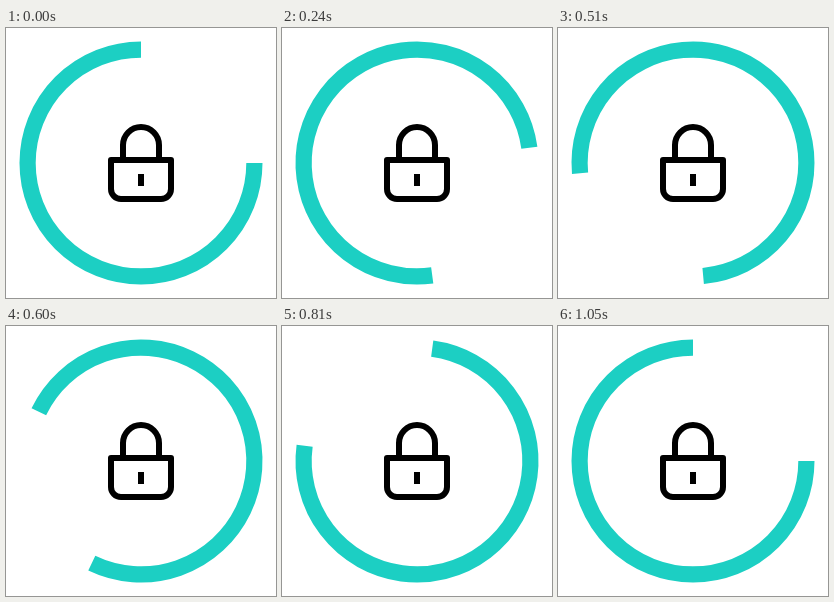
Recreate the animation shown at these times as an HTML page. Size 270 by 270 pixels, loop 1080 ms.

```html
<!DOCTYPE html>
<html lang="en">
<head>
<meta charset="utf-8">
<title>Locked loader</title>
<style>
  html, body { margin: 0; height: 100%; overflow: hidden; background: #fff; }
  svg { display: block; width: 100vw; height: 100vh; }
</style>
</head>
<body>
<svg viewBox="0 0 270 270" fill="none">
  <path id="ring" d="M248.4 135A113.4 113.4 0 1 1 135 21.6" stroke="#1ccfc3" stroke-width="16.2"/>
  <g stroke="#000" stroke-width="6" stroke-linejoin="round">
    <path d="M117 132V117a18 18 0 0 1 36 0V132"/>
    <path d="M105 132H165V161a10 10 0 0 1-10 10H115a10 10 0 0 1-10-10Z"/>
    <path d="M135 146V158"/>
  </g>
</svg>
<script>
  const LOOP = 1080, STEP = 30, TURN_STEPS = 35;
  const ring = document.getElementById('ring');

  // One full turn in 35 steps; the last step rests at the starting pose.
  function draw(time) {
    const step = Math.floor((time % LOOP) / STEP);
    ring.setAttribute('transform', `rotate(${step * 360 / TURN_STEPS} 135 135)`);
    requestAnimationFrame(draw);
  }
  requestAnimationFrame(draw);
</script>
</body>
</html>
```
